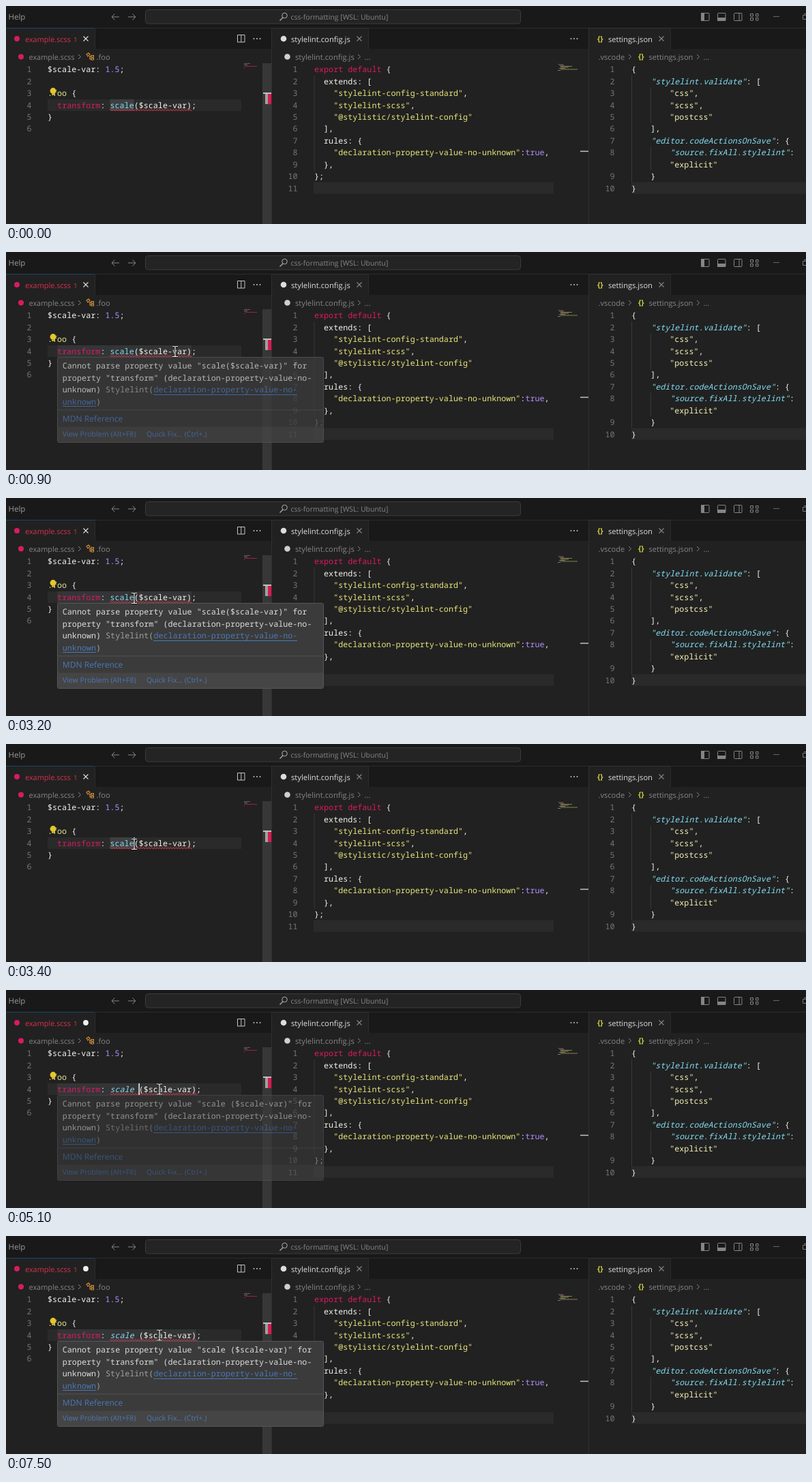
Write an HTML page that moves like this. It is 1173 px wide and 320 px high and loops after 7.6 s.

```html
<!DOCTYPE html>
<html lang="en">
<head>
<meta charset="utf-8">
<title>Editor hover</title>
<style>
html, body { margin: 0; width: 100%; height: 100%; overflow: hidden; background: #191919; }
svg { display: block; width: 1173px; height: 320px; }
text { white-space: pre; text-rendering: geometricPrecision; }
.ui { font-family: "Open Sans", "Noto Sans", sans-serif; fill: #868686; }
.code { font: 500 11.73px "Noto Sans Mono", "DejaVu Sans Mono", monospace; fill: #f2f2ee; }
.num { fill: #757575; font-weight: 400; }
.key { fill: #d81b60; }
.str { fill: #e9e57a; }
.pale { fill: #f4f1b4; }
.fn { fill: #82dcf0; }
.it { fill: #82dcf0; font-style: italic; }
.sel { fill: #e2e58a; }
.val { fill: #b48cff; }
.tip { fill: #dcdcdc; }
.dim { fill: #a0a0a0; }
.link { fill: #4a78b8; }
</style>
</head>
<body>
<svg id="stage" viewBox="0 0 1173 320"></svg>
<script>
const NS = "http://www.w3.org/2000/svg";
const stage = document.getElementById("stage");
const CW = 7.04, ROW = 17.45, LOOP = 7600;

function add(tag, attrs, parent = stage) {
  const el = document.createElementNS(NS, tag);
  for (const k in attrs) el.setAttribute(k, attrs[k]);
  parent.appendChild(el);
  return el;
}
const rect = (x, y, width, height, fill, parent, more) =>
  add("rect", { x, y, width, height, fill, ...more }, parent);
const path = (d, stroke = "#868686", w = 1, parent) =>
  add("path", { d, stroke, "stroke-width": w, fill: "none" }, parent);
const dot = (cx, cy, r, fill, parent) => add("circle", { cx, cy, r, fill }, parent);
const group = parent => add("g", {}, parent);
const show = (el, on) => el.setAttribute("visibility", on ? "visible" : "hidden");

function ui(x, y, size, str, fill, parent) {
  const el = add("text", { x, y, class: "ui", "font-size": size }, parent);
  if (fill) el.style.fill = fill;
  el.textContent = str;
  return el;
}
function code(x, y, parts, parent) {
  const el = add("text", { x, y, class: "code" }, parent);
  for (const [cls, str] of parts) add("tspan", { class: cls }, el).textContent = str;
  return el;
}
const base = row => 97.2 + ROW * (row - 1);
const top4 = 137;

function numbers(right, list) {
  list.forEach((n, i) => {
    if (!n) return;
    const el = code(right, base(i + 1), [["num", String(n)]]);
    el.setAttribute("text-anchor", "end");
  });
}
const closeMark = (x, color) => path(`M${x - 3.5} 44.5l7 7m0-7l-7 7`, color, 1.1);
const chevron = x => path(`M${x - 2} 71l3.5 3.5l-3.5 3.5`);
const more = x => [-4.5, 0, 4.5].forEach(d => dot(x + d, 48, 1, "#c4c4c4"));
const braces = (x, y) => ui(x, y, 11, "{}", "#cbcb41").setAttribute("font-weight", 700);

// Window frame
rect(0, 0, 1173, 320, "#191919");
rect(0, 32, 1173, 1, "#2b2b2b");
rect(0, 63, 1173, 257, "#212121");
[[0, 130, "#1b456c"], [390, 141, "#333333"], [855, 119, "#333333"]].forEach(([x, w, edge]) => {
  rect(x, 33, w, 31, "#212121");
  rect(x, 32, w, 1, edge);
  rect(x + w, 33, 1, 30, "#2b2b2b");
});
rect(389, 33, 1, 287, "#303030");
rect(854, 33, 1, 287, "#303030");

// Title bar
ui(3.5, 20, 11.5, "Help", "#9a9a9a");
path("M166 16h-11m4.5-4.5l-4.5 4.5l4.5 4.5M179 16h11m-4.5-4.5l4.5 4.5l-4.5 4.5");
rect(204.5, 5.5, 550, 20.5, "#242424", stage, { rx: 4, stroke: "#3c3c3c" });
add("circle", { cx: 408.5, cy: 14, r: 3.8, fill: "none", stroke: "#b0b0b0" });
path("M406 17l-4.5 4.5", "#b0b0b0", 1.2);
ui(417.5, 19.5, 10.45, "css-formatting [WSL: Ubuntu]");
const tool = "#858585";
[1019, 1043, 1067].forEach(x =>
  rect(x + .5, 10.5, 11.5, 11, "none", stage, { stroke: tool, rx: 1 }));
rect(1019, 10, 5, 12, tool);
rect(1043, 17, 12, 5, tool);
path("M1075 10v12", tool);
path("M1091.5 11.5h4v3.5h-4zM1091.5 17.5h4v3.5h-4zM1099.5 11.5h3.5v3.5h-3.5zM1099.5 17.5h3.5v3.5h-3.5z", tool);
path("M1125 15.5h9", "#666");
path("M1168.5 13.5h6v6h-6zM1170 11.5h5", "#777");

// Tabs and breadcrumbs
dot(16, 48, 4, "#d81b60");
ui(28, 52.5, 10.9, "example.scss", "#d9304f");
ui(99, 52.5, 10, "1", "#d9304f");
const closeTab = closeMark(117, "#e0e0e0");
const dirtyTab = dot(117, 48, 3.9, "#f0f0f0");
path("M339.5 42.5h10.5v10.5h-10.5zM344.8 42.5v10.5", "#c4c4c4");
more(368);
dot(407, 48, 4.3, "#dddddd");
ui(418, 52.5, 11.25, "stylelint.config.js", "#dedede");
closeMark(518, "#868686");
more(833);
braces(867, 52);
ui(883, 52.5, 11.1, "settings.json", "#dedede");
closeMark(961, "#868686");

dot(22, 74.5, 4, "#d81b60");
ui(33.5, 78.5, 10.9, "example.scss");
chevron(108);
path("M118 71l3-2l2 2l-3 3zM122 74h3m-2 0v4h2M125 72.5h3.5v2.5h-3.5zM125 76.5h3.5v2.5h-3.5z", "#d8923a", 1.1);
ui(132.5, 78.5, 11.1, ".foo");
dot(412.5, 74.5, 4.3, "#cfcfcf");
ui(424, 78.5, 11.25, "stylelint.config.js");
chevron(518);
ui(525.5, 78.5, 11.1, "...");
ui(868.5, 78.5, 11.1, ".vscode");
chevron(915);
braces(927, 78);
ui(942.5, 78.5, 11.1, "settings.json");
chevron(1015);
ui(1022.5, 78.5, 11.1, "...");

// Left pane
rect(61, top4, 284, 17, "#2a2a2a");
const wordBox = rect(152.5, top4, 35.2, 17, "#3d3f41");
const rangeBox = rect(75, top4, 197, 17, "#343536");
const brackets = group();
[194.8, 272.2].forEach(x =>
  rect(x + .5, top4 + .5, 6.5, 16, "#2b352b", brackets, { stroke: "#7d7d7d", "stroke-width": .8 }));
numbers(37.5, [1, 2, 3, 4, 5, 6]);
code(61, base(1), [["", "$scale-var: "], ["val", "1.5"], ["", ";"]]);
code(61, base(3), [["sel", ".foo"], ["", " {"]]);
code(75.1, base(4), [["key", "transform"], ["", ":"]]);
const fnText = code(152.5, base(4), [["fn", "scale"]]).firstChild;
const args = code(187.7, base(4), [["", "($scale-var);"]]);
code(61, base(5), [["", "}"]]);

function squiggle(chars) {
  let d = "M152.5 152.8";
  for (let x = 0; x < chars * CW - 2; x += 4) d += "q1 -2.6 2 0t2 0";
  return path(d, "#e0364c", 1);
}
const wave = squiggle(17), longWave = squiggle(18);

dot(69, 124.5, 4.4, "#e6c72a");
rect(67, 128, 4, 3, "#c9ac24");
rect(376, 84, 13, 236, "#373737");
rect(380, 129, 4, 15, "#a0a0a0");
rect(384, 128, 5, 16, "#d81b50");
rect(377, 127, 12, 2, "#c0c0c0");

// Minimaps
[[349, 84, 9, "#777"], [349, 86, 5, "#8b8b60"], [350, 88, 18, "#d81b60"], [349, 90, 1, "#777"],
  [809, 85, 8, "#a03058"], [811, 86.5, 7, "#999"], [813, 88, 17, "#a5a35c"], [813, 89.5, 12, "#a5a35c"],
  [811, 91, 9, "#999"], [813, 92.5, 25, "#a5a35c"], [809, 94, 4, "#999"]
].forEach(([x, y, w, fill]) => rect(x, y, w, 1, fill, stage, { opacity: .75 }));

// Middle pane
rect(451, 258.5, 352, 17.3, "#2a2a2a");
rect(451.5, 102, 1, 140, "#393939");
numbers(427.5, [1, 2, 3, 4, 5, 6, 7, 8, 9, 10, 11]);
[
  [["key", "export default"], ["", " {"]],
  [["", "  extends: ["]],
  [["str", '    "stylelint-config-standard"'], ["", ","]],
  [["str", '    "stylelint-scss"'], ["", ","]],
  [["str", '    "@stylistic/stylelint-config"']],
  [["", "  ],"]],
  [["", "  rules: {"]],
  [["str", '    "declaration-property-value-no-unknown"'], ["", ":"], ["val", "true"], ["", ","]],
  [["", "  },"]],
  [["", "};"]]
].forEach((parts, i) => code(452, base(i + 1), parts));
rect(842, 212.5, 12, 1.6, "#b8b8b8");

// Right pane
rect(917, 258.5, 256, 17.3, "#2a2a2a");
rect(917, 102, 1, 157, "#393939");
rect(945, 119.5, 1, 52.5, "#393939");
rect(945, 206.5, 1, 35, "#393939");
numbers(892.5, [1, 2, 3, 4, 5, 6, 7, 8, 0, 9, 10]);
[
  [["", "{"]],
  [["it", '    "stylelint.validate"'], ["", ": ["]],
  [["pale", '        "css"'], ["", ","]],
  [["pale", '        "scss"'], ["", ","]],
  [["pale", '        "postcss"']],
  [["", "    ],"]],
  [["it", '    "editor.codeActionsOnSave"'], ["", ": {"]],
  [["it", '        "source.fixAll.stylelint"'], ["", ":"]],
  [["pale", '        "explicit"']],
  [["", "    }"]],
  [["", "}"]]
].forEach((parts, i) => code(917, base(i + 1), parts));

// Hover card
const card = group();
rect(75.5, 154.5, 390, 125, "#3b3b3b", card, { rx: 2, stroke: "#565656" });
rect(76, 256.5, 389, 22.5, "#454545", card);
rect(76, 231.5, 389, 1, "#525252", card);
const problem = code(82.8, 171.3, [["tip", ""]], card).firstChild;
code(82.8, 188.8, [["tip", 'property "transform" (declaration-property-value-no-']], card);
code(82.8, 206.2, [["tip", "unknown) "], ["dim", "Stylelint("], ["link", "declaration-property-value-no-"]], card);
code(82.8, 223.7, [["link", "unknown"], ["dim", ")"]], card);
const link = "#4a78b8";
path("M216 209.5h211M83 226.5h49", link, 1, card);
ui(82.8, 249.4, 12.1, "MDN Reference", link, card);
ui(82.8, 271, 10.65, "View Problem (Alt+F8)", link, card);
ui(206, 271, 10.6, "Quick Fix... (Ctrl+.)", link, card);

const caret = rect(187.4, top4, 1.6, 17, "#e8e8e8");
const mouse = group();
const beam = "M-4-7.5h2.5q1.5 0 1.5 1.5v12q0 1.5-1.5 1.5h-2.5M4-7.5h-2.5q-1.5 0-1.5 1.5M4 7.5h-2.5q-1.5 0-1.5-1.5";
path(beam, "#151515", 2.6, mouse);
path(beam, "#f2f2f2", 1.2, mouse);

// Steps: time, then values
const mouseSteps = [
  [100, 310, 265], [300, 250, 190], [500, 238, 150], [600, 248, 146],
  [2300, 248, 146], [2800, 128, 147], [3100, 208, 147], [3200, 188, 147],
  [3500, 188, 147], [4100, 226, 258], [4500, 225, 207], [4900, 225, 145.5],
  [6600, 225, 145.5], [6700, 236, 146], [6800, 236, 146], [7000, 225, 145.5]
];
const cardSteps = [
  [800, 0], [900, .8], [1000, 1], [3300, 1], [3400, 0],
  [4900, 0], [5000, .3], [5100, .6], [5200, .88], [5300, 1]
];
function at(steps, t) {
  const i = steps.findIndex(s => s[0] > t);
  if (i < 0) return steps[steps.length - 1].slice(1);
  if (i === 0) return steps[0].slice(1);
  const a = steps[i - 1], b = steps[i];
  const k = (t - a[0]) / (b[0] - a[0]);
  return a.slice(1).map((v, j) => v + (b[j + 1] - v) * k);
}

function draw(now) {
  const t = Math.floor((now % LOOP) / 100) * 100;
  const typed = t >= 4000, parsed = t >= 4200;
  const [alpha] = at(cardSteps, t);
  const [mx, my] = at(mouseSteps, t);

  mouse.setAttribute("transform", `translate(${mx} ${my})`);
  show(mouse, t >= 100);
  card.setAttribute("opacity", alpha);
  show(rangeBox, alpha > 0);
  rangeBox.setAttribute("width", typed ? 204 : 197);
  show(wordBox, !typed && alpha === 0);
  show(brackets, parsed && alpha === 0);
  show(closeTab, !typed);
  show(dirtyTab, typed);
  show(wave, !parsed);
  show(longWave, parsed);
  fnText.setAttribute("class", parsed ? "it" : "fn");
  args.setAttribute("x", 187.7 + (typed ? CW : 0));
  problem.textContent = `Cannot parse property value "scale${typed ? " " : ""}($scale-var)" for`;

  const blink = typed ? Math.floor((t - 4000) / 500) % 2 === 0 : t >= 3400 && t < 3900;
  show(caret, blink);
  caret.setAttribute("x", typed ? 194.4 : 187.4);
}

const start = performance.now();
function tick() {
  draw(performance.now() - start);
  requestAnimationFrame(tick);
}
tick();
</script>
</body>
</html>
```
